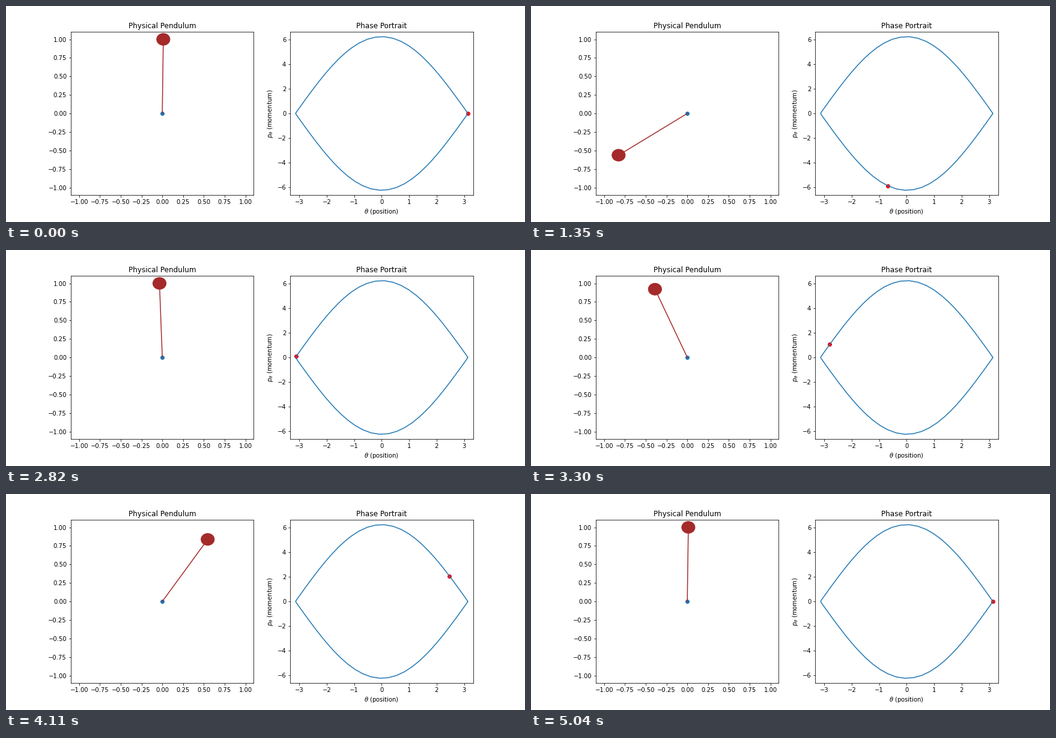
Write a matplotlib script that moves like this. It is 864 px wide and 360 px high and loops after 5.07 s.

```python
import numpy as np
import matplotlib.pyplot as plt
from matplotlib.animation import FuncAnimation
from matplotlib.patches import Circle

FRAMES, INTERVAL = 169, 30
G, DT, SUBSTEPS = 9.81, 0.05, 20

plt.rcParams.update({"font.family": "DejaVu Sans", "font.size": 10})


def slope(state):
    theta, p = state
    return np.array([p, -G * np.sin(theta)])


def rk4(state, h):
    a = slope(state)
    b = slope(state + h / 2 * a)
    c = slope(state + h / 2 * b)
    d = slope(state + h * c)
    return state + h / 6 * (a + 2 * b + 2 * c + d)


def trajectory(theta, p):
    """States of a unit pendulum, one per frame."""
    state = np.array([theta, p])
    path = [state]
    for _ in range(FRAMES - 1):
        for _ in range(SUBSTEPS):
            state = rk4(state, DT / SUBSTEPS)
        path.append(state)
    return np.array(path)


# Released almost upright, just before its turning point
path = trajectory(np.pi - 0.01212, 0.00178)

fig, (left, right) = plt.subplots(1, 2, figsize=(12, 5), dpi=72)
fig.subplots_adjust(left=0.125, right=0.9, bottom=0.125, top=0.88, wspace=0.2)

left.set_title("Physical Pendulum")
left.set(xlim=(-1.1, 1.1), ylim=(-1.1, 1.1))
ticks = np.linspace(-1, 1, 9)
left.set_xticks(ticks)
left.set_yticks(ticks)
left.scatter([0], [0], color="C0")
rod, = left.plot([], [], color="brown", lw=1.5)
bob = left.add_patch(Circle((0, 1), 0.08, color="brown"))

right.set_title("Phase Portrait")
right.set_xlabel(r"$\theta$ (position)")
right.set_ylabel(r"$p_\theta$ (momentum)")
right.plot(path[:, 0], path[:, 1], color="C0", lw=1.5)
dot = right.scatter([0], [0], color="red")
right.set(xlim=(-3.327, 3.327), ylim=(-6.65, 6.65))
right.set_xticks(range(-3, 4))
right.set_yticks(range(-6, 7, 2))


def update(i):
    theta = path[i, 0]
    x, y = np.sin(theta), -np.cos(theta)
    rod.set_data([0, x], [0, y])
    bob.center = x, y
    # The phase marker trails the bob by one step
    dot.set_offsets(path[max(i - 1, 0)])
    return rod, bob, dot


anim = FuncAnimation(fig, update, frames=FRAMES, interval=INTERVAL,
                     repeat=True, repeat_delay=0)
plt.show()
```
